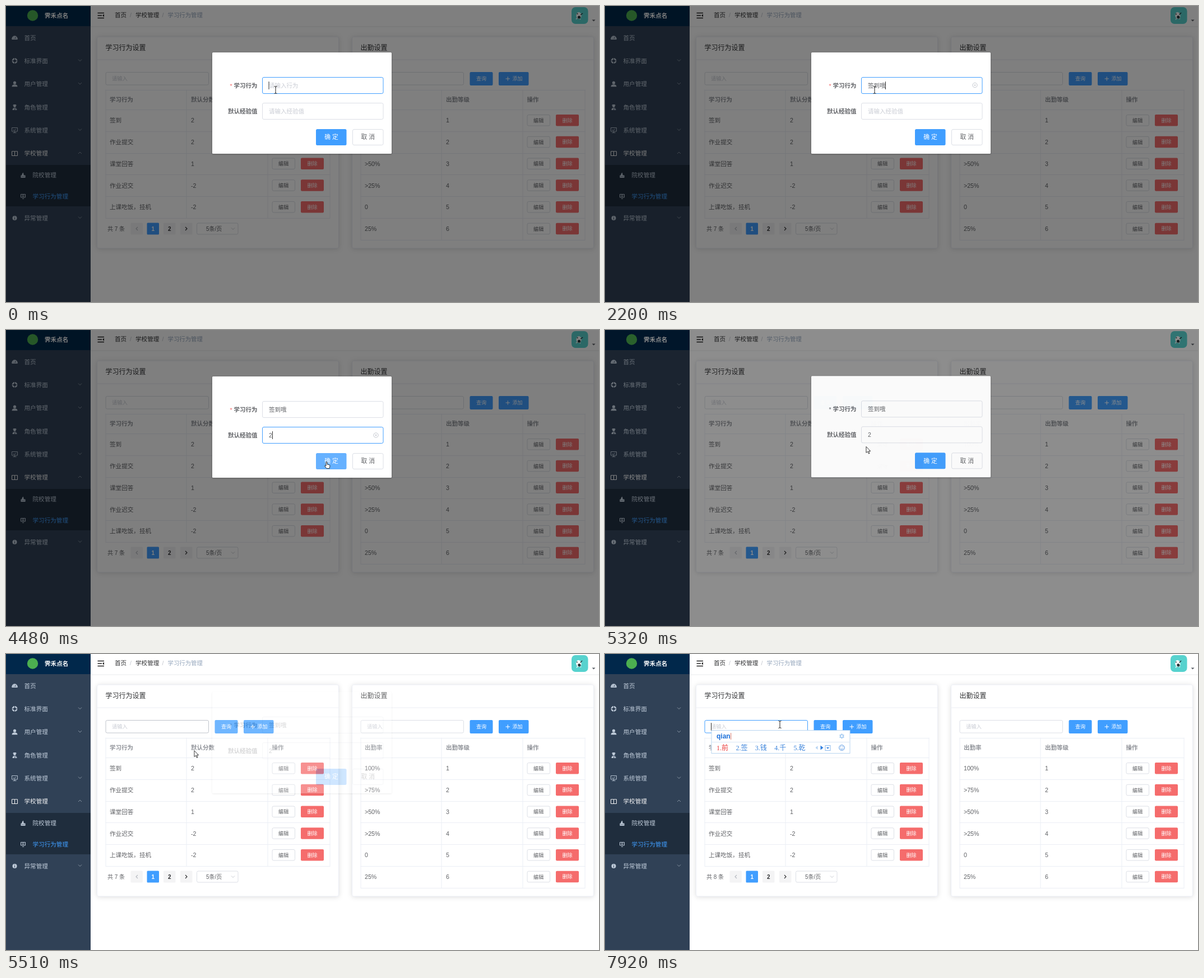
Write an HTML page that moves like this. It is 1058 px wide and 529 px high and loops after 7.99 s.

```html
<!DOCTYPE html>
<html lang="zh-CN">
<head>
<meta charset="utf-8">
<title>学习行为管理</title>
<style>
html, body { margin: 0; width: 100%; height: 100%; overflow: hidden; background: #fff; }
svg { display: block; width: 1058px; height: 529px; }
text { font-family: 'Liberation Sans', 'Noto Sans CJK SC', 'Noto Sans CJK', sans-serif; white-space: pre; }
.card { filter: drop-shadow(0 1.5px 4.5px rgba(0, 0, 0, .13)); }
.dialog { filter: drop-shadow(0 1px 1.5px rgba(0, 0, 0, .3)); }
</style>
</head>
<body>
<svg id="stage" viewBox="0 0 1058 529"></svg>
<script>
const LOOP = 7990;
const BLUE = '#409eff', RED = '#f56c6c', LINE = '#dcdfe6', HOVER = '#c0c4cc', HINT = '#c9ccd4', BODY = '#606266';

// Markup helpers; text is placed by its vertical centre.
const rect = (x, y, w, h, fill, more = '') =>
  `<rect x="${x}" y="${y}" width="${w}" height="${h}" fill="${fill}" ${more}/>`;
const text = (x, y, s, size = 10.6, fill = BODY, more = '') =>
  `<text x="${x}" y="${y + size * .37}" font-size="${size}" fill="${fill}" ${more}>${s}</text>`;
const path = (d, stroke, width = 1, more = '') =>
  `<path d="${d}" fill="none" stroke="${stroke}" stroke-width="${width}" ${more}/>`;
const group = (x, y, inner, more = '') => `<g transform="translate(${x} ${y})" ${more}>${inner}</g>`;
const box = (x, y, w, h, more = '') =>
  rect(x + .5, y + .5, w - 1, h - 1, '#fff', `rx="2.5" stroke="${LINE}" ${more}`);
const BOLD = 'font-weight="700"', MID = 'text-anchor="middle"';

const chevron = (x, y, up, color) => path(`M${x - 3} ${y + (up ? 1.5 : -1.5)}l3 ${up ? -3 : 3} 3 ${up ? 3 : -3}`, color, .9);

const icons = {
  gauge: c => `<path d="M-5 3A5.2 5.2 0 1 1 5 3Z" fill="${c}"/>` + path('M0 2L2 -2M-3 1h1M3 1h-1M-2 -2l.6 .6', '#304156', .9),
  ring: c => `<circle r="3.7" fill="none" stroke="${c}" stroke-width="2.4"/>` + path('M0 -5v2.6M0 5V2.4M-5 0h2.6M5 0H2.4', '#304156', 1),
  user: c => `<circle cy="-2.3" r="2.6" fill="${c}"/><path d="M-5 4.8Q-5 .8 0 .8T5 4.8Z" fill="${c}"/>`,
  role: c => `<circle cy="-2" r="2.3" fill="${c}"/><path d="M-3.5 -3h7l-1.5 -2h-4ZM-4 5Q-4 1 0 1T4 5Z" fill="${c}"/>` + path('M0 2v3M1 3h2', '#304156', .8),
  screen: c => path('M-5 -4.5H5V2H-5ZM0 2v2.5M-3 4.5h6M-2.5 -1l2 1.5 3 -3', c, .9),
  book: c => path('M0 -3.5V4.5M0 -3.7H-5V4H5V-3.7Z', c, 1),
  school: c => `<path d="M-4 4.5V0h2v-2l2 -3 1 3v2h3v4.5Z" fill="${c}"/>` + path('M-2 1.5v1.5M0 1.5v1.5M2 1.5v1.5', '#1f2d3d', .8),
  badge: c => path('M-4 -3.5h8v5.5h-8ZM-1.5 4.3h3', c, 1) + `<circle cy="-.7" r="1.5" fill="none" stroke="${c}"/>`,
  info: c => `<circle r="4" fill="${c}"/>` + path('M0 -2.4v1M0 -.5v3', '#304156', 1.1),
};

function sidebar() {
  const grey = '#bfcbd9';
  const items = [
    [57, '首页', 'gauge'], [98, '标准界面', 'ring', 1], [139.5, '用户管理', 'user', 1],
    [181, '角色管理', 'role'], [222, '系统管理', 'screen', 1], [263.5, '学校管理', 'book', 2], [379, '异常管理', 'info', 1],
  ];
  const subs = [[302.5, '院校管理', 'school', grey], [340, '学习行为管理', 'badge', BLUE]];
  return rect(0, 0, 151, 529, '#304156') + rect(0, 0, 151, 36, '#01284b') + rect(0, 284, 151, 74, '#1f2d3d') +
    '<circle cx="47.5" cy="17" r="9.7" fill="#4caf50"/>' + text(69, 17, '霁禾点名', 10.6, '#fff', BOLD) +
    items.map(([y, label, icon, arrow]) => {
      const color = arrow === 2 ? '#f4f4f5' : grey;
      return group(15.5, y, icons[icon](color)) + text(32.5, y, label, 10.6, color) +
        (arrow ? chevron(132, y - 1, arrow === 2, '#909caa') : '');
    }).join('') +
    subs.map(([y, label, icon, color]) => group(30.5, y, icons[icon](grey)) + text(47.5, y, label, 10.6, color)).join('');
}

function header() {
  return rect(151, 36.5, 907, 1, '#e9ebee') +
    path('M163.5 12.5h11.5M163.5 17h7.5M163.5 21.5h11.5', '#222', 1.3) + '<path d="M175 14.6v4.8l-3 -2.4Z" fill="#222"/>' +
    text(194, 16.5, '首页', 10.6, '#303133') + text(221, 16.5, '/', 10.6, HOVER) +
    text(231, 16.5, '学校管理', 10.6, '#303133') + text(278.5, 16.5, '/', 10.6, HOVER) +
    text(288.5, 16.5, '学习行为管理', 10.4, '#97a8be') +
    rect(1009, 2, 29.5, 30, '#57d2ce', 'rx="7"') +
    `<g id="pet"><ellipse cx="1022" cy="17" rx="4.6" ry="6" fill="#fff"/>
      <circle cx="1022.5" cy="20" r="2.6" fill="#25363a"/><circle cx="1019.5" cy="14" r="1" fill="#25363a"/>
      ${path('M1025 16l4 -3', '#25363a', 1.4)}${path('M1019 22l-2 1.5M1024 23l1 1', '#fff', 1.6)}</g>` +
    '<path d="M1045.500 24.500h6l-3 3Z" fill="#5a5e66"/>';
}

const solid = (x, y, w, h, fill, label, size = 9.1) =>
  rect(x, y, w, h, fill, 'rx="2"') + text(x + w / 2, y + h / 2, label, size, '#fff', MID);

function card(x, title, heads, rows, bottom, id) {
  const left = x + 15, end = x + 416;
  const rowY = i => 204.5 + i * 38.75;
  let out = rect(x, 55, 431, 378, '#fff', 'rx="3" stroke="#ebeef5" class="card"') +
    rect(x, 95.5, 431, 1, '#ebeef5') + text(left, 75, title, 12, '#303133') +
    box(left, 118, 184.5, 23.5, `id="${id}"`) + text(left + 11.5, 130, '请输入', 9.3, HINT) +
    solid(x + 210, 118, 41, 24, BLUE, '查询') + solid(x + 261.5, 118, 53.5, 24, BLUE, '') +
    path(`M${x + 274} 130h7.5m-3.750 -3.750v7.5`, '#fff', 1) + text(x + 286, 130, '添加', 9.1, '#fff');
  const edges = [149.5, 185, ...rows.map((_, i) => 185 + (i + 1) * 38.75)];
  out += path(edges.map(y => `M${left} ${Math.round(y) + .5}H${end}`).join('') +
    [left + .5, x + 159.5, x + 304.5, end - .5].map(c => `M${c} 149.500V${bottom}`).join(''), '#ebeef5');
  const columns = [x + 22.5, x + 167.5, x + 312];
  out += heads.map((h, i) => text(columns[i], 167, h, 10.5, '#909399', BOLD)).join('');
  rows.forEach((row, i) => {
    const y = rowY(i);
    out += row.map((cell, c) => text(columns[c], y, cell)).join('') +
      box(columns[2], y - 10.5, 41.5, 20.5) + text(columns[2] + 20.7, y, '编辑', 9.1, BODY, MID) +
      solid(columns[2] + 51.5, y - 10.5, 41, 20.5, RED, '删除');
  });
  return out;
}

function pager() {
  const key = (x, fill) => rect(x, 387.5, 21.5, 21, fill, 'rx="1.5"');
  return text(181, 398, '共 7 条', 10, BODY, 'id="total"') +
    key(222.5, '#f4f4f5') + key(251.5, BLUE) + key(281, '#f4f4f5') + key(311, '#f4f4f5') +
    path('M235 395l-3 3 3 3', '#b4b8bf', 1.1) + path('M320 395l3 3 -3 3', '#303133', 1.2) +
    text(262.3, 398, '1', 10, '#fff', MID + BOLD) + text(291.8, 398, '2', 10, '#303133', MID + BOLD) +
    box(340, 387.5, 74.5, 21) + text(357, 398, '5条/页', 10) + chevron(405, 398, false, HOVER);
}

const clearIcon = (id, y) => group(660, y, `<circle r="4.2" fill="none" stroke="${HOVER}" stroke-width=".9"/>` +
  path('M-1.6 -1.6l3.2 3.2m0 -3.2l-3.2 3.2', HOVER, .9), `id="${id}"`);

function dialog() {
  return rect(368, 83, 320, 181, '#fff', 'rx="1.5" class="dialog"') +
    text(399.5, 143, '*', 10.6, RED, 'id="star"') +
    text(448.5, 142, '学习行为', 10.5, BODY, BOLD + ' text-anchor="end"') +
    text(448.5, 188, '默认经验值', 10.5, BODY, BOLD + ' text-anchor="end"') +
    box(457, 127, 216.5, 30, 'id="field1"') + text(469, 142, '', 10.5, BODY, 'id="value1"') + clearIcon('clear1', 141.5) +
    box(457, 173, 216.5, 30, 'id="field2"') + text(469, 188, '', 10.5, BODY, 'id="value2"') + clearIcon('clear2', 188) +
    rect(553, 220, 54.5, 29, BLUE, 'rx="2.5" id="ok"') + text(580.5, 234.5, '确 定', 10.8, '#fff', MID) +
    box(618, 220, 55.5, 29) + text(645.7, 234.5, '取 消', 10.8, BODY, MID);
}

function ime() {
  const slots = [0, 1, 2, 3, 4].map(i =>
    text(0, 31.3, '', 12, i ? '#3d85dc' : '#ea3b3b', `class="slot" style="font-family:'Liberation Serif','Noto Sans CJK SC',serif"`)).join('');
  const teeth = [0, 60, 120].map(a => path('M0 -4.5V4.5', '#a9cdf2', 2, `transform="rotate(${a})"`)).join('');
  return rect(.5, .5, 247, 41, '#fff', 'stroke="#b9d5f0" id="panel"') + rect(1, 21, 246, 1, '#dbe8f6', 'id="rule"') +
    text(9.5, 10.3, '', 12, '#1b6fd9', BOLD + ' id="pinyin"') + rect(0, 5, 1, 12, '#d8786a', 'id="imeCaret"') +
    slots + group(0, 0,
      '<path d="M190 28v7l-4 -3.500Z" fill="#b5d3f3"/><path d="M195 27.500v8l5 -4Z" fill="#2f7fe0"/>' +
      rect(203.5, 27.5, 9, 9, '#fff', 'stroke="#8bb9ec"') + '<path d="M205.500 30.800h5l-2.500 3Z" fill="#2f7fe0"/>' +
      '<circle cx="233" cy="31.500" r="4.800" fill="none" stroke="#4a8fe2"/>' + path('M230.500 32.500q2.500 3.500 5 0M231.300 29v1.500M234.700 29v1.500', '#4a8fe2', 1) +
      group(233, 10.8, teeth + '<circle r="2.600" fill="#fff" stroke="#a9cdf2" stroke-width="1.600"/>'), 'id="tools"');
}

const beam = path('M-2.5 -6.5Q0 -6.5 0 -5V5Q0 6.500 -2.5 6.5M2.5 -6.5Q0 -6.5 0 -5M0 5Q0 6.5 2.5 6.5', '#222', 1);
const arrow = '<path d="M0 0V11l2.600 -2.300 1.800 4 1.700 -.700 -1.800 -3.900h3.400Z" fill="#fff" stroke="#222" stroke-width=".9"/>';
const hand = '<path d="M-1 0q1 -1 2 0v4l4 1q1 .5 1 2l-1 4.500h-5l-3.500 -4.500q0 -1.500 2.500 0Z" fill="#fff" stroke="#222" stroke-width=".9"/>';

const behaviours = [['签到', 2], ['作业提交', 2], ['课堂回答', 1], ['作业迟交', -2], ['上课吃饭，挂机', -2]];
const rates = ['100%', '&gt;75%', '&gt;50%', '&gt;25%', '0', '25%'].map((rate, i) => [rate, i + 1]);

document.getElementById('stage').innerHTML =
  rect(0, 0, 1058, 529, '#fff') + sidebar() + header() +
  card(162.5, '学习行为设置', ['学习行为', '默认分数', '操作'], behaviours, 379, 'search') + pager() +
  card(617.5, '出勤设置', ['出勤率', '出勤等级', '操作'], rates, 418, 'search2') +
  rect(0, 0, 1058, 529, '#000', 'id="shade"') + `<g id="dialog">${dialog()}</g>` +
  rect(0, 0, 1, 14, '#333', 'id="caret"') + `<g id="ime">${ime()}</g>` +
  `<g id="cursor"><g id="beam">${beam}</g><g id="arrow">${arrow}</g><g id="hand">${hand}</g></g>`;

const el = {};
document.querySelectorAll('[id]').forEach(n => el[n.id] = n);
const slots = [...document.querySelectorAll('.slot')];
const set = (node, attrs) => { for (const k in attrs) node.setAttribute(k, attrs[k]); };
const show = (node, on) => node.style.display = on ? '' : 'none';

// Linear track through [time, value...] points.
function track(points, t) {
  const i = points.findIndex(p => p[0] > t);
  if (i === 0) return points[0].slice(1);
  if (i < 0) return points[points.length - 1].slice(1);
  const a = points[i - 1], b = points[i], k = (t - a[0]) / (b[0] - a[0]);
  return a.slice(1).map((v, j) => v + (b[j + 1] - v) * k);
}

const mouse = [
  [2620, 481, 150], [2950, 499, 209], [3370, 505, 196], [3700, 505, 196], [4200, 572, 236], [5090, 572, 236],
  [5180, 550, 229], [5320, 467, 208.5], [5420, 363.5, 196.5], [5590, 312, 152], [5740, 300, 157],
  [6280, 298, 156.5], [6400, 305, 138], [6520, 312, 126],
];
const leaving = [[5250, 0], [5320, .035], [5420, .25], [5510, .75], [5590, 1]];
const shading = [[5250, .5], [5320, .45], [5420, .21], [5510, 0]];

const candidates = {
  "q": '去 请 起 前 却', "qi": '其 起 期 七 气', "qia": '恰 卡 掐 洽 其', "qian": '前 签 钱 千 乾',
  "qian'd": '签到 前 签 钱 千', "qian'da": '欠打 前 签 钱 千', "qian'dao": '签到 前 签 钱 千', "qian'dao'o": '签到哦 签到 前 签 钱',
};
const typing = [
  [0, ''], [550, 'q'], [700, 'qi'], [800, 'qia'], [940, 'qian'], [1100, "qian'd"], [1240, "qian'da"],
  [1340, "qian'dao"], [1500, "qian'dao'o"], [1700, ''], [7550, 'q'], [7640, 'qi'], [7740, 'qia'], [7830, 'qian'],
];

function drawIme(t) {
  const typed = typing.filter(p => p[0] <= t).pop()[1];
  show(el.ime, typed);
  if (!typed) return;
  set(el.ime, { transform: t < 5000 ? 'translate(469 149)' : 'translate(189.5 136)' });
  el.pinyin.textContent = typed;
  el.imeCaret.setAttribute('x', 10 + el.pinyin.getComputedTextLength());
  let x = 9.5;
  candidates[typed].split(' ').forEach((word, i) => {
    slots[i].textContent = `${i + 1}.${word}`;
    slots[i].setAttribute('x', x);
    x += 22.4 + 12 * word.length;
  });
  const extra = x - 181.5;
  set(el.panel, { width: 247 + extra });
  set(el.rule, { width: 246 + extra });
  set(el.tools, { transform: `translate(${extra} 0)` });
}

function drawField(n, value, hint, focused, hovered) {
  const node = el['value' + n];
  node.textContent = value || hint;
  set(node, { fill: value ? BODY : HINT });
  set(el['field' + n], { stroke: focused ? BLUE : hovered ? HOVER : LINE });
  show(el['clear' + n], focused && value);
}

function render(t) {
  const [x, y] = track(mouse, t), [gone] = track(leaving, t);
  const over = (l, top, w, h) => x >= l && x <= l + w && y >= top && y <= top + h;
  const open = t < 5300;
  const on1 = open && over(457, 127, 216, 30), on2 = open && over(457, 173, 216, 30);
  const onOk = open && over(553, 220, 54, 29), onSearch = !open && over(177, 118, 185, 24);
  const focus = t < 3560 ? 1 : t < 5000 ? 2 : t < 6680 ? 0 : 3;

  set(el.shade, { opacity: track(shading, t)[0] });
  set(el.dialog, { opacity: 1 - gone, transform: `translate(0 ${-20 * gone})` });
  show(el.dialog, gone < 1);
  drawField(1, t >= 1700 ? '签到哦' : '', '请输入行为', focus === 1, on1);
  drawField(2, t >= 4450 ? '2' : '', '请输入经验值', focus === 2, on2);
  set(el.ok, { fill: onOk ? '#66b1ff' : BLUE });
  set(el.star, { fill: t < 5250 ? RED : BODY });
  set(el.search, { stroke: focus === 3 ? BLUE : t > 5480 ? HOVER : LINE });
  el.total.textContent = t < 5740 ? '共 7 条' : '共 8 条';

  show(el.caret, focus && Math.floor(t / 530) % 2 === 0);
  const spot = focus === 1 ? [t < 1700 ? 468.5 : 500, 135] : focus === 2 ? [t < 4450 ? 468.5 : 475, 181] : [189, 123];
  set(el.caret, { x: spot[0], y: spot[1] });

  drawIme(t);
  set(el.cursor, { transform: `translate(${x} ${y})` });
  show(el.beam, on1 || on2 || onSearch);
  show(el.hand, onOk);
  show(el.arrow, !(on1 || on2 || onSearch || onOk));
  set(el.pet, { transform: `rotate(${10 * Math.sin(t / 130)} 1022 18)` });
}

const start = performance.now();
(function tick() {
  render((performance.now() - start) % LOOP);
  requestAnimationFrame(tick);
})();
</script>
</body>
</html>
```
